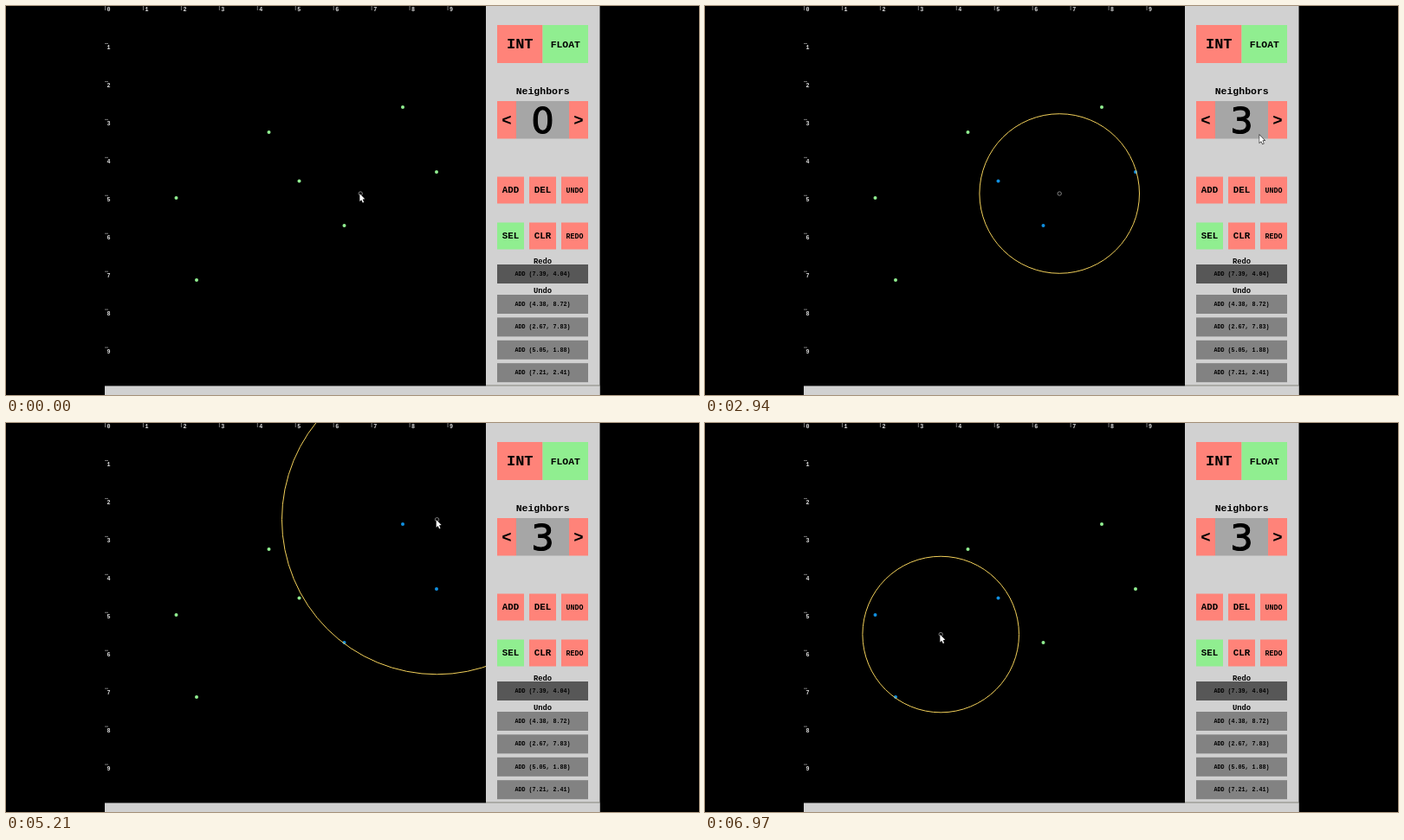
An HTML page with a canvas that plays this animation: 800 px wide and 450 px high, repeating every 7.05 s.

```html
<!DOCTYPE html>
<html>
<head>
<meta charset="utf-8">
<style>
html, body { margin: 0; width: 100%; height: 100%; overflow: hidden; background: #000; }
canvas { display: block; }
</style>
</head>
<body>
<canvas id="stage" width="800" height="450"></canvas>
<script>
const ctx = document.getElementById('stage').getContext('2d');
const LOOP = 7050, LAST = 6970, STEP = 200 / 3;
const LEFT = 114, RIGHT = 554, BOTTOM = 439, EDGE = 685.5, UNIT = 43.95;
const RED = '#ff8379', GREEN = '#90ee90', PANEL = '#d1d1d1';
const MONO = '"Courier New", "Liberation Mono", monospace';
const HOME = [409.2, 217];

const points = [[458, 117], [303.5, 146], [338.5, 202.5], [497, 192], [196.5, 222], [390.5, 254], [220, 317]];

// Pointer moves before the drag: [start, end, x, y]
const moves = [[0, 467, 438, 224], [667, 933, 580, 127], [1700, 2000, 667, 139.5],
  [2667, 2933, 641, 149], [2933, 3200, ...HOME]];

// Evenly timed points of the dragged query
const DRAG = 3200, LEG = 1900 / 3;
const drag = [HOME, [245, 235], [325, 167.5], [490, 105], [463.8, 201], [345, 255], [270.3, 244.2]];

// Button presses: [change, first time, gap, presses]; the counter wraps from 0 to 5
const presses = [[-1, 1000, 167, 6], [1, 1933, 0, 1], [1, 2200, 67, 3], [-1, 2467, 0, 1]];

const clamp = (v, lo, hi) => Math.min(hi, Math.max(lo, v));
const ease = u => u * u * (3 - 2 * u);

function countAt(t) {
  let n = 0;
  for (const [change, first, gap, times] of presses)
    for (let i = 0; i < times; i++) if (t + 1 >= first + i * gap) n += change;
  return (n + 6) % 6;
}

// Catmull-Rom curve through the drag points
function queryAt(t) {
  const s = clamp((t - DRAG) / LEG, 0, drag.length - 1.001);
  const i = Math.floor(s), u = s - i;
  const [a, b, c, d] = [-1, 0, 1, 2].map(k => drag[clamp(i + k, 0, drag.length - 1)]);
  return [0, 1].map(k => b[k] + u / 2 * (c[k] - a[k]
    + u * (2 * a[k] - 5 * b[k] + 4 * c[k] - d[k] + u * (3 * (b[k] - c[k]) + d[k] - a[k]))));
}

function pointerAt(t) {
  let [x, y] = t < DRAG ? HOME : queryAt(t);
  if (t < DRAG) for (const [start, end, tx, ty] of moves) {
    const u = ease(clamp((t - start) / (end - start), 0, 1));
    x += (tx - x) * u;
    y += (ty - y) * u;
  }
  return [x - 0.8, y + 0.3];
}

function box(x, y, w, h, color) {
  ctx.fillStyle = color;
  ctx.fillRect(x, y, w, h);
}

function text(str, x, y, size, color = '#000') {
  ctx.font = `bold ${size}px ${MONO}`;
  ctx.fillStyle = color;
  ctx.textAlign = 'center';
  ctx.fillText(str, x, y + size * 0.31);
}

function button(label, x, y, w, h, size, color = RED) {
  box(x, y, w, h, color);
  text(label, x + w / 2, y + h / 2, size);
}

function circle(x, y, r) {
  ctx.beginPath();
  ctx.arc(x, y, r, 0, Math.PI * 2);
}

function drawRuler() {
  for (let n = 0; n < 10; n++) {
    const d = n * UNIT;
    box(LEFT + d, 0, 1, 5, '#777');
    text(n, LEFT + 4.5 + d, 3.5, 6.7, '#ddd');
    if (!n) continue;
    box(LEFT, d - 1, 4, 1, '#777');
    text(n, LEFT + 4.5, 4 + d, 6.7, '#ddd');
  }
}

function drawPlot([qx, qy], count) {
  const dist = p => Math.hypot(p[0] - qx, p[1] - qy);
  const near = [...points].sort((a, b) => dist(a) - dist(b)).slice(0, count);
  ctx.save();
  ctx.beginPath();
  ctx.rect(LEFT, 0, RIGHT - LEFT, BOTTOM);
  ctx.clip();
  drawRuler();
  for (const p of points) {
    circle(...p, 2);
    ctx.fillStyle = near.includes(p) ? '#108fe0' : GREEN;
    ctx.fill();
  }
  ctx.lineWidth = 1;
  if (count) {
    circle(qx, qy, dist(near[count - 1]) + 1);
    ctx.strokeStyle = '#f2d05a';
    ctx.stroke();
  }
  circle(qx, qy, 2.2);
  ctx.strokeStyle = '#808080';
  ctx.stroke();
  ctx.restore();
}

function drawCounter(count) {
  box(589, 110, 61, 43.5, '#a6a6a6');
  ctx.font = '41px "DejaVu Sans", sans-serif';
  ctx.fillStyle = ctx.strokeStyle = '#000';
  ctx.lineWidth = 1.2;
  ctx.fillText(count, 619.5, 147);
  ctx.strokeText(count, 619.5, 147);
}

function drawPanel(count) {
  box(RIGHT, 0, EDGE - RIGHT, 450, PANEL);
  box(LEFT, 439.5, EDGE - LEFT, 10.5, PANEL);
  box(RIGHT, 438.5, EDGE - RIGHT, 1, '#85857c');

  button('INT', 567, 22, 52.5, 44, 17);
  button('FLOAT', 619.5, 22, 52.5, 44, 11.4, GREEN);

  text('Neighbors', 619.7, 98, 11.5);
  button('<', 567, 110, 22, 43.5, 19);
  button('>', 650, 110, 22, 43.5, 19);
  drawCounter(count);

  [['ADD', 'DEL', 'UNDO'], ['SEL', 'CLR', 'REDO']].forEach((row, j) => row.forEach((label, i) =>
    button(label, 567 + i * 37, 197.5 + j * 53, 31, 31, i < 2 ? 10.8 : 8.3, label === 'SEL' ? GREEN : RED)));

  text('Redo', 619.5, 295, 8.8);
  button('ADD (7.39, 4.04)', 567, 299, 105, 22, 6.7, '#575757');
  text('Undo', 619.5, 329.5, 8.8);
  ['(4.38, 8.72)', '(2.67, 7.83)', '(5.05, 1.88)', '(7.21, 2.41)'].forEach((at, i) =>
    button('ADD ' + at, 567, 334 + i * 26.4, 105, 22, 6.7, '#828282'));
}

function drawPointer([x, y]) {
  ctx.save();
  ctx.translate(x, y);
  ctx.lineWidth = 1.1;
  ctx.strokeStyle = '#111';
  ctx.fillStyle = '#fff';
  const arrow = new Path2D('M0 0V8.6L1.9 6.9 3.4 10.2 4.7 9.6 3.3 6.3 5.8 6Z');
  ctx.stroke(arrow);
  ctx.fill(arrow);
  ctx.restore();
}

function draw(t) {
  const count = countAt(t);
  box(0, 0, 800, 450, '#000');
  drawPlot(queryAt(t), count);
  drawPanel(count);
  drawPointer(pointerAt(t));
}

const start = performance.now();
function tick() {
  const t = (performance.now() - start) % LOOP;
  draw(t >= LAST ? LAST : Math.floor((t + 4) / STEP) * STEP);
  requestAnimationFrame(tick);
}
tick();
</script>
</body>
</html>
```
